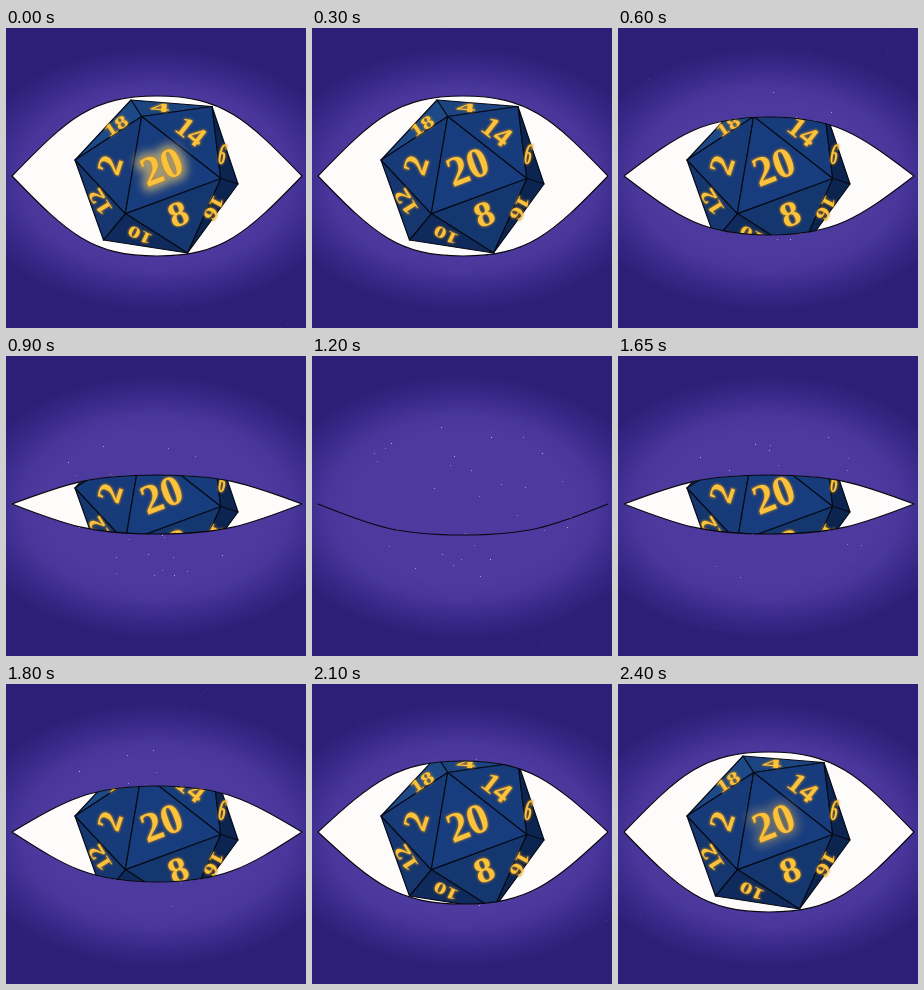
Recreate the animation shown at these times as an HTML page. Size 300 by 300 pixels, loop 2550 ms.

```html
<!DOCTYPE html>
<html lang="en">
<head>
<meta charset="utf-8">
<title>Blinking die</title>
<style>
html, body { margin: 0; width: 100%; height: 100%; overflow: hidden; background: #2d1f78; }
svg { display: block; width: 100vw; height: 100vh; }
text { font-family: "Liberation Serif", serif; font-weight: bold; text-anchor: middle; }
</style>
</head>
<body>
<svg viewBox="0 0 300 300">
  <defs>
    <radialGradient id="aura" gradientUnits="userSpaceOnUse" cx="0" cy="0" r="1"
      gradientTransform="translate(150 151) scale(194 132)">
      <stop offset=".58" stop-color="#4c3a9f"/>
      <stop offset=".7" stop-color="#48369a"/>
      <stop offset=".86" stop-color="#382887"/>
      <stop offset="1" stop-color="#2d1f78"/>
    </radialGradient>
    <filter id="soft" x="-30%" y="-30%" width="160%" height="160%">
      <feGaussianBlur stdDeviation="1.2"/>
    </filter>
    <filter id="wide" x="-60%" y="-60%" width="220%" height="220%">
      <feGaussianBlur stdDeviation="4.5"/>
    </filter>
    <clipPath id="open"><path id="hole"/></clipPath>
  </defs>
  <rect width="300" height="300" fill="url(#aura)"/>
  <g id="stars"></g>
  <g clip-path="url(#open)">
    <rect width="300" height="300" fill="#fefcfb"/>
    <g id="faces" stroke="#050a16" stroke-width="1.2" stroke-linejoin="round"></g>
    <g id="glow" fill="#f0cf78" stroke="#f0cf78" stroke-width="11" stroke-linejoin="round" filter="url(#wide)"></g>
    <g id="blur" fill="#c98a1c" stroke="#c98a1c" stroke-width="1.5" filter="url(#soft)" opacity=".7"></g>
    <g id="nums" fill="#fcc23c"></g>
  </g>
  <path id="lids" fill="none" stroke="#08060f" stroke-width="1.1" stroke-linejoin="round"/>
</svg>
<script>
const NS = "http://www.w3.org/2000/svg";
const $ = id => document.getElementById(id);
const add = (parent, tag, attrs) => {
  const el = document.createElementNS(NS, tag);
  for (const k in attrs) el.setAttribute(k, attrs[k]);
  return parent.appendChild(el);
};

// Die corners: outer ring a-f, front triangle x, y, z
const P = {
  a: "125,72", b: "206,78.5", c: "232,156", d: "181.5,225", e: "97.5,212", f: "69,132",
  x: "135.7,88.5", y: "214.7,150.5", z: "119.3,185.6"
};
const faces = {
  abx: "#1b4480", afx: "#1d4a86", bxy: "#173c7c", bcy: "#0c2450", cdy: "#0c2450",
  dyz: "#15376f", dez: "#0f2a5c", efz: "#15366e", fxz: "#173a79", xyz: "#183d7e"
};
for (const f in faces) {
  add($("faces"), "polygon", { points: [...f].map(k => P[k]).join(" "), fill: faces[f] });
}

// text, x, y, turn, size, x scale, y scale
const labels = [
  ["20", 155.5, 138.5, -21, 42, 1, 1], ["14", 185, 103.5, 38, 30, 1, .95],
  ["8", 172, 186, -22, 37, 1.05, .95], ["2", 104, 137, -72, 31, 1.15, 1.1],
  ["18", 110, 98, -34, 23, 1.1, .75], ["4", 154, 79.5, 4, 26, 1.5, .48],
  ["6", 216.5, 126, 12, 30, .5, 1], ["12", 94, 174, -122, 26, 1.05, .8],
  ["10", 134, 207, 206, 23, 1.1, .7], ["16", 208, 180, 118, 24, 1.05, .75]
];
const write = (parent, [s, x, y, turn, size, sx, sy]) => {
  add(parent, "text", {
    "font-size": size, y: size * .335,
    transform: `translate(${x} ${y}) rotate(${turn}) scale(${sx} ${sy})`
  }).textContent = s;
};
for (const label of labels) {
  write($("blur"), label);
  write($("nums"), label);
}
write($("glow"), labels[0]);

function rng(seed) {
  return () => {
    seed = (seed * 16807) % 2147483647;
    return seed / 2147483647;
  };
}

// Lid heights per stage, from wide open to shut
const upper = [68, 68, 68, 77, 89, 102, 119, 157, 179];
const lower = [228, 228, 228, 220, 207, 198, 178, 179, 179];
const glow = [.62, .28];
const STEP = 150, COUNT = 17, SHUT = 8, MID = 148;

function drawStars(step, stage) {
  const r = rng(7919 + step * 1301);
  const group = $("stars");
  group.replaceChildren();
  const dot = (x, y, fill, opacity) =>
    add(group, "rect", { x: Math.round(x), y: Math.round(y), width: 1, height: 1, fill, opacity });
  for (let i = 0; i < 80; i++) dot(r() * 300, r() * 300, "#5a55b8", .35);
  const n = stage < 3 ? 0 : 14 + stage * 2;
  for (let i = 0; i < n; i++) {
    const a = r() * Math.PI * 2, d = Math.sqrt(r());
    dot(150 + Math.cos(a) * d * 112, 145 + Math.sin(a) * d * 82, r() < .4 ? "#e5c36a" : "#d8d2ee", .4 + r() * .45);
  }
}

// Lid edge from one corner to the other, nearly straight at the corners
function lid(from, to, y) {
  const side = MID + (y - MID) * .725;
  const at = t => from + (to - from) * t;
  return `C${at(.193)} ${side} ${at(.276)} ${y} ${at(.5)} ${y}` +
    `C${at(.724)} ${y} ${at(.807)} ${side} ${to} ${MID}`;
}

function draw(step) {
  // Closes over stages 0-8, rests one step, then opens the same way
  const stage = step <= SHUT ? step : COUNT - step;
  const d = `M6 ${MID}${lid(6, 296, upper[stage])}${lid(296, 6, lower[stage])}Z`;
  $("hole").setAttribute("d", d);
  $("lids").setAttribute("d", d);
  $("glow").setAttribute("opacity", glow[stage] || 0);
  drawStars(step === SHUT + 1 ? SHUT : step, stage);
}

let last = -1;
const start = performance.now();
function tick() {
  const step = Math.floor((performance.now() - start) / STEP) % COUNT;
  if (step !== last) draw(last = step);
  requestAnimationFrame(tick);
}
tick();
</script>
</body>
</html>
```
